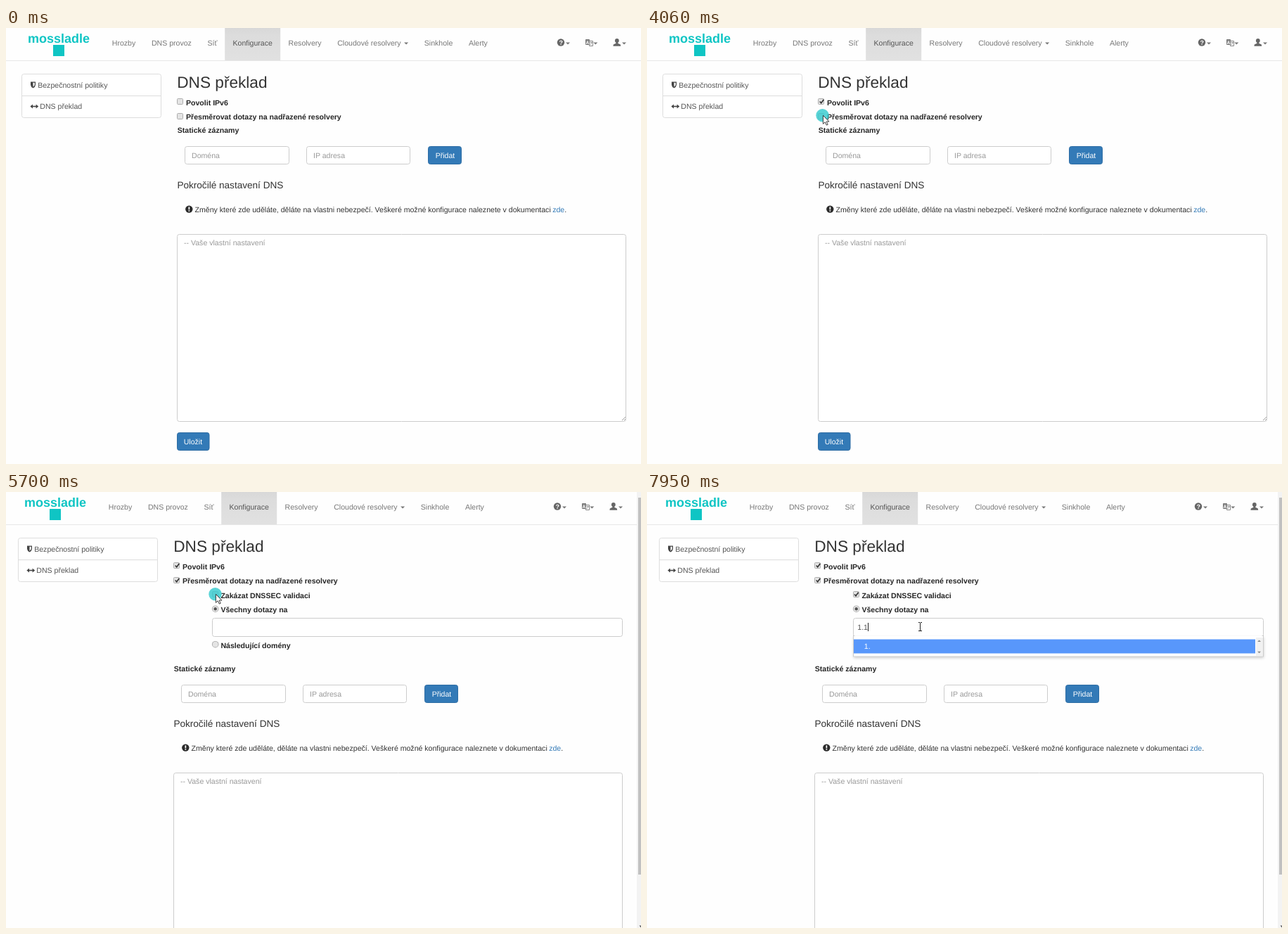
These frames come from a looping animation (903x620 px, 8000 ms). An HTML page with a canvas:

```html
<!DOCTYPE html>
<html lang="cs">
<head>
<meta charset="utf-8">
<title>DNS překlad</title>
<style>
html, body { margin: 0; width: 100%; height: 100%; overflow: hidden; background: #fefefe; }
canvas { display: block; }
</style>
</head>
<body>
<canvas id="stage" width="903" height="620"></canvas>
<script>
const LOOP = 8000;
const SIZE = 10.57;
const TEAL = '#0fc5c4';
const INK = '#333';
const g = document.getElementById('stage').getContext('2d');

// Mouse moves: start, end, steps, cubic curve, easing
const easeOut = u => 1 - Math.pow(1 - u, 2.5);
const smooth = u => u * u * (3 - 2 * u);
const moves = [
  [670, 1470, 11, [583, 30, 440, 90, 282, 195, 249, 107], easeOut],
  [1720, 1721, 1, [250, 105, 250, 105, 250, 105, 250, 105], smooth],
  [2855, 3520, 9, [250, 105, 299, 100, 299, 130, 250, 124], smooth],
  [4435, 4810, 5, [250, 124, 270, 105, 320, 155, 358, 176], smooth],
  [4950, 4951, 1, [358, 178, 358, 178, 358, 178, 358, 178], smooth],
  [5025, 5630, 8, [358, 178, 340, 167, 318, 155, 298, 145], smooth],
  [6005, 6450, 6, [298, 145, 325, 160, 360, 180, 388, 191], smooth]
];
const clicks = [[2090, 2240], [4060, 4200], [5700, 5850], [6530, 6680]];

function bezier(p, u) {
  const v = 1 - u;
  const at = i => v * v * v * p[i] + 3 * v * v * u * p[i + 2] + 3 * v * u * u * p[i + 4] + u * u * u * p[i + 6];
  return { x: Math.round(at(0)), y: Math.round(at(1)) };
}

function pointer(t) {
  const move = moves.filter(m => t >= m[0]).pop();
  if (!move) return null;
  const [start, end, steps, curve, ease] = move;
  const u = Math.min(1, Math.floor((t - start) / (end - start) * steps) / steps);
  return bezier(curve, ease(u));
}

function text(s, x, y, color = INK, size = SIZE, weight = 'normal') {
  g.font = `${weight} ${size}px "Liberation Sans", Arial, sans-serif`;
  g.textRendering = 'geometricPrecision';
  g.fillStyle = color;
  g.fillText(s, x, y);
}

const bold = (s, x, y) => text(s, x, y, '#262626', SIZE, 'bold');

function fill(x, y, w, h, color) {
  g.fillStyle = color;
  g.fillRect(x, y, w, h);
}

function box(x, y, w, h, stroke = '#ccc', inside = '#fff', r = 3) {
  g.beginPath();
  g.roundRect(Math.floor(x) + 0.5, Math.floor(y) + 0.5, w, h, r);
  g.fillStyle = inside;
  g.fill();
  g.lineWidth = 1;
  g.strokeStyle = stroke;
  g.stroke();
}

function disc(x, y, r, color) {
  g.beginPath();
  g.arc(x, y, r, 0, Math.PI * 2);
  g.fillStyle = color;
  g.fill();
}

function poly(points, color) {
  g.beginPath();
  for (let i = 0; i < points.length; i += 2) g.lineTo(points[i], points[i + 1]);
  g.closePath();
  g.fillStyle = color;
  g.fill();
}

const caretDown = (x, y, w, color) => poly([x, y, x + w, y, x + w / 2, y + w / 2], color);

function line(points, color, width) {
  g.beginPath();
  for (let i = 0; i < points.length; i += 2) g.lineTo(points[i], points[i + 1]);
  g.strokeStyle = color;
  g.lineWidth = width;
  g.stroke();
}

function checkbox(x, y, on) {
  box(x, y, 8, 8, '#adadad', '#e4e4e4', 1);
  if (on) line([x + 2, y + 4.5, x + 4, y + 6.7, x + 7.6, y + 1.8], '#333', 1.7);
}

function radio(x, y, on) {
  disc(x, y, 4.8, '#a9a9a9');
  disc(x, y, 3.9, '#e4e4e4');
  if (on) disc(x, y, 2.2, '#555');
}

function button(label, x, y, w, pad) {
  box(x, y, w, 25, '#2e6da4', '#337ab7');
  text(label, x + pad, y + 16.7, '#fff');
}

function header(hover) {
  fill(-10, 46, 930, 1, '#e7e7e7');
  text('mossladle', 31, 21, TEAL, 18, 'bold');
  fill(67, 24, 16, 16, TEAL);

  const shade = g.createLinearGradient(0, 0, 0, 46);
  shade.addColorStop(0, '#d8d8d8');
  shade.addColorStop(0.2, '#dcdcdc');
  shade.addColorStop(1, '#e1e1e1');
  fill(311.2, 0, 79, 46, shade);

  const links = [['Hrozby', 150.8], ['DNS provoz', 206.9], ['Síť', 286.4], ['Konfigurace', 322.5],
    ['Resolvery', 401.6], ['Cloudové resolvery', 471.2], ['Sinkhole', 594.8], ['Alerty', 657.9]];
  for (const [label, x] of links) {
    const strong = label === 'Konfigurace' ? '#555' : '#777';
    text(label, x, 24.8, hover && x === 471.2 ? '#333' : strong);
  }
  caretDown(566.1, 20.5, 6, hover ? '#333' : '#777');

  disc(789, 20.5, 5.2, '#666');
  text('?', 786.4, 24, '#fff', 9, 'bold');
  box(824, 16, 5, 7, '#777', '#888', 0);
  text('A', 824.6, 23, '#fff', 6.5, 'bold');
  box(829, 18, 5, 7, '#888', '#fff', 0);
  line([830.5, 20.5, 833.5, 20.5, 830.5, 24], '#777', 0.8);
  disc(868.8, 18, 2.9, '#666');
  poly([863.4, 25.8, 863.8, 23.4, 867.4, 21.8, 867.4, 19, 870.2, 19, 870.2, 21.8, 873.8, 23.4, 874.2, 25.8], '#666');
  for (const x of [796, 835.3, 876]) caretDown(x, 20.5, 6, '#777');
}

function sidebar() {
  box(22.5, 65, 198, 62, '#ddd');
  fill(23, 96, 197, 1, '#ddd');
  g.beginPath();
  g.moveTo(35, 76.5);
  g.lineTo(42, 76.5);
  g.lineTo(42, 81);
  g.quadraticCurveTo(41.6, 84, 38.5, 85.6);
  g.quadraticCurveTo(35.4, 84, 35, 81);
  g.closePath();
  g.fillStyle = '#444';
  g.fill();
  poly([38.5, 77.7, 40.8, 77.7, 40.8, 81, 38.5, 84], '#fff');
  text('Bezpečnostní politiky', 45.2, 84.6, '#555');

  fill(37, 110.7, 7, 1.6, '#444');
  poly([34.4, 111.5, 38, 108.6, 38, 114.4], '#444');
  poly([46.2, 111.5, 42.6, 108.6, 42.6, 114.4], '#444');
  text('DNS překlad', 48.3, 115.4, '#555');
}

function lowerForm() {
  bold('Statické záznamy', 243.8, 149.3);
  box(254.5, 168, 148, 25);
  text('Doména', 264, 184.8, '#999');
  box(427.5, 168, 147, 25);
  text('IP adresa', 437, 184.8, '#999');
  button('Přidat', 600.5, 168, 47, 10.2);

  text('Pokročilé nastavení DNS', 243.4, 227.8, INK, 13.59);
  disc(260.3, 257.6, 5.2, '#2b2b2b');
  fill(259.5, 254.3, 1.7, 4, '#fff');
  fill(259.5, 259.2, 1.7, 1.6, '#fff');
  text('Změny které zde uděláte, děláte na vlastni nebezpečí. Veškeré možné konfigurace naleznete v dokumentaci', 268.6, 261.6);
  text('zde', 777.2, 261.6, '#337ab7');
  text('.', 794.3, 261.6);

  box(243.5, 293, 638, 266);
  text('-- Vaše vlastní nastavení', 253, 309.2, '#999');
  line([876, 558, 881, 553], '#888', 0.8);
  line([879, 558, 881, 556], '#888', 0.8);
  button('Uložit', 243.5, 575, 45.5, 9.2);
}

function forwarding(t) {
  checkbox(293, 141, t >= 5850);
  bold('Zakázat DNSSEC validaci', 305.4, 150.6);
  radio(297.7, 166.2, true);
  bold('Všechny dotazy na', 305.4, 171);
  radio(297.7, 216.7, false);
  bold('Následující domény', 305.4, 221.6);
  box(293, 179, 583, 26);
  if (t >= 6600) dropdown(t);
}

function dropdown(t) {
  const typed = t >= 7950 ? '1.1' : t >= 7870 ? '1.' : t >= 7730 ? '1' : '';
  const bottom = typed ? 234 : 214;
  g.save();
  g.shadowColor = 'rgba(0,0,0,.2)';
  g.shadowBlur = 4;
  g.shadowOffsetY = 2;
  fill(293.5, 205, 583, bottom - 205, '#fff');
  g.restore();
  fill(293, 203, 1, bottom - 203, '#ccc');
  fill(876, 203, 1, bottom - 203, '#ccc');
  fill(293, bottom - 0.5, 584, 0.8, '#ccc');

  if (typed) {
    fill(294, 209.5, 571, 20, '#5897fb');
    text(typed.slice(0, 2), 308.8, 223.2, '#fff');
    fill(866, 207, 10, 26, '#f1f1f1');
    poly([868.2, 213, 873, 213, 870.6, 210.4], '#888');
    caretDown(868.2, 226.8, 4.8, '#888');
  } else {
    poly([868.6, 210, 872.6, 210, 870.6, 208], '#ddd');
    caretDown(868.6, 210, 4, '#ccc');
  }

  text(typed, 299.3, 196, '#555');
  if (t < 7050 || t >= 7590) fill(299 + Math.round(g.measureText(typed).width), 186, 1, 12, '#222');
}

function scrollbar() {
  fill(897, 0, 6, 620, '#f3f3f3');
  fill(899, 8, 4, 536, '#c1c1c1');
  poly([900.5, 616.5, 903, 616.5, 903, 619.5], '#555');
}

function drawPointer(t) {
  const p = pointer(t);
  if (!p) return;
  if (clicks.some(([a, b]) => t >= a && t < b)) disc(p.x - 0.5, p.y + 0.3, 9.2, 'rgba(54,202,206,.82)');

  if (t > 6000 && p.y >= 179) {
    fill(p.x, p.y - 5, 1, 12, '#222');
    for (const y of [p.y - 6, p.y + 6]) {
      fill(p.x - 2, y, 2, 1, '#222');
      fill(p.x + 1, y, 2, 1, '#222');
    }
    return;
  }
  g.save();
  g.translate(p.x + 0.4, p.y + 0.3);
  g.scale(0.755, 0.755);
  poly([0, 0, 0, 16, 3.7, 12.5, 6.5, 18.3, 9, 17.2, 6.3, 11.6, 11.3, 11.6], '#fff');
  g.strokeStyle = '#222';
  g.lineWidth = 1.15;
  g.stroke();
  g.restore();
}

function draw(t) {
  const open = t >= 4200;
  fill(0, 0, 903, 620, '#fefefe');
  g.save();
  if (open) g.translate(-5, 0);
  header(t >= 670 && t < 740);
  sidebar();
  text('DNS překlad', 243.2, 85, INK, 22.65);
  checkbox(243.7, 100, t >= 2240);
  bold('Povolit IPv6', 256, 109.8);
  checkbox(243.7, 121, open);
  bold('Přesměrovat dotazy na nadřazené resolvery', 256, 130.3);
  if (open) g.translate(0, 106.3 - 0.3);
  lowerForm();
  g.restore();

  if (open) {
    forwarding(t);
    scrollbar();
  }
  drawPointer(t);
}

const begin = performance.now();
function tick() {
  draw((performance.now() - begin) % LOOP);
  requestAnimationFrame(tick);
}
tick();
</script>
</body>
</html>
```
